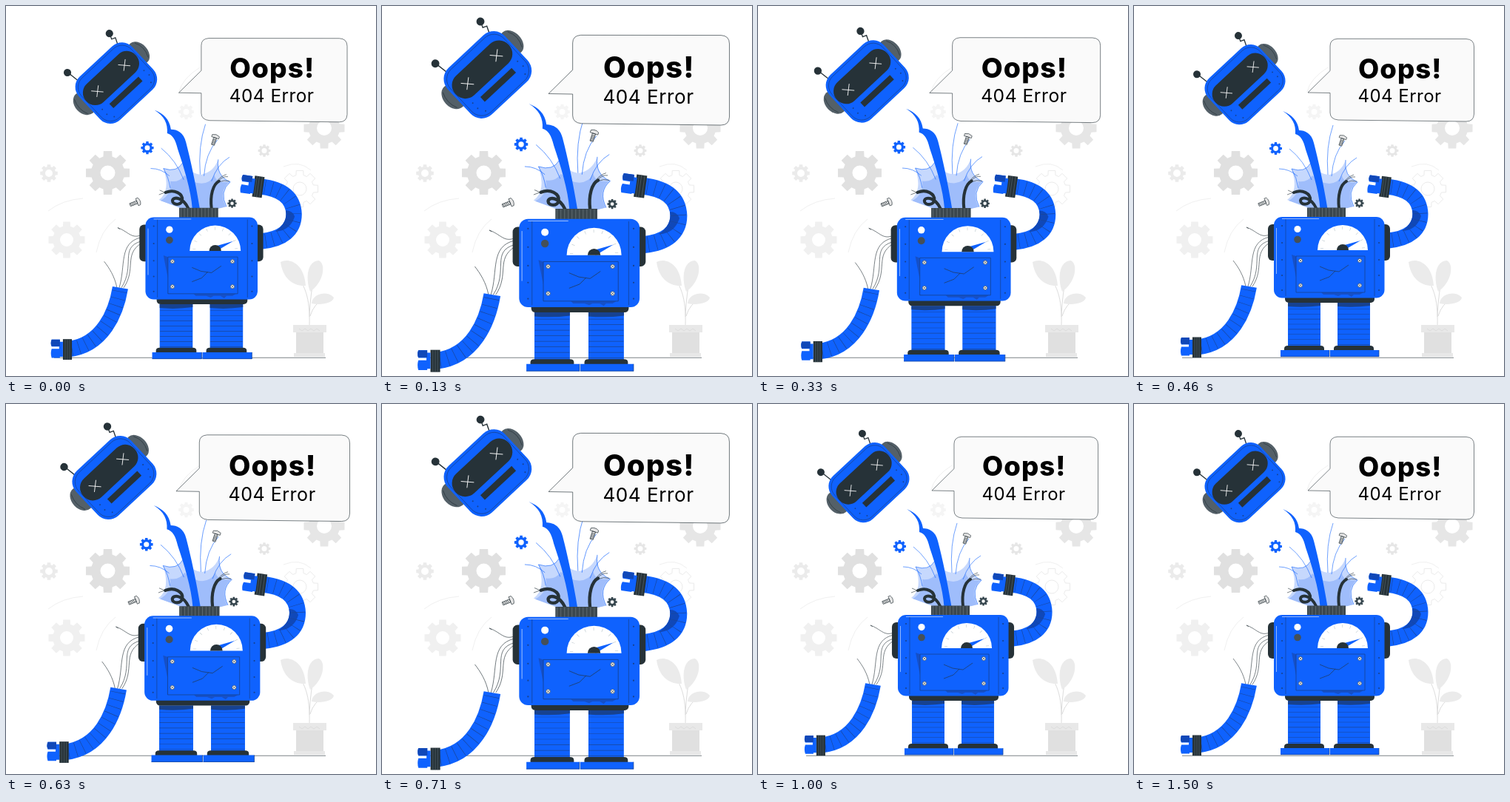
Animation of 500x500 px, one loop 1.54 s. Source, as an HTML page:

```html
<!DOCTYPE html>
<html lang="en">
<head>
<meta charset="utf-8">
<title>404 Error</title>
<style>
  html, body { margin: 0; height: 100%; overflow: hidden; background: #fff; }
  svg { display: block; width: 100vw; height: 100vh; }
  text { font-family: Inter, Roboto, sans-serif; text-anchor: middle; }
  .blue { fill: #0f62fe; }
  .dark { fill: #263238; }
  .grey { fill: #546068; }
  .line { fill: none; stroke: #263238; stroke-width: .6; }
  .faint { fill: none; stroke: #f0f0f0; stroke-width: 1; }
  .spark { fill: none; stroke: #0f62fe; stroke-width: .6; }
  .tube { fill: none; stroke: #263238; stroke-width: 4; stroke-linecap: round; }
  .arm { fill: none; stroke: #0f62fe; stroke-width: 21; }
  .ribs { fill: none; stroke: #1a4596; stroke-width: 19; stroke-dasharray: .6 9; stroke-dashoffset: -5; }
  .edge { fill: none; stroke: #174290; stroke-width: .7; }
  .shine { fill: none; stroke: #cfdffd; stroke-width: .7; }
</style>
</head>
<body>
<svg viewBox="0 0 500 500">
  <defs>
    <path id="stump" d="M155.500 379C150 412 132 456 86 461"/>
    <path id="elbow" d="M344 317C372 314 387 302 387 281C386 257 368 247 342 244"/>
    <g id="leg">
      <path class="blue" d="M208 401h44v60h-44z"/>
      <path fill="#174290" d="M208 401h44v4q-22 3 -44 1z"/>
      <path d="M230 409V459" fill="none" stroke="#1a4596" stroke-width="43" stroke-dasharray=".6 6.300"/>
      <path class="dark" d="M203 466v-3q0 -4 5 -4h44q5 0 5 4v3z"/>
      <path class="blue" d="M198 465h66v9h-66z"/>
      <path class="edge" d="M198 473.700h66M264 465v9"/>
    </g>
    <g id="screw">
      <circle r="2.600" fill="#f5f5f5" stroke="#263238" stroke-width=".5"/>
      <path class="line" d="M-1.500 -1.500l3 3M-1.500 1.500l3 -3"/>
    </g>
    <g id="bolt" stroke="#263238" stroke-width=".6" fill="#e6e6e6">
      <path d="M-2 -3h4v10h-4zM-5 -6q5 -3 10 0v3h-10z"/>
      <path d="M-2 0l4 -1M-2 2l4 -1M-2 4l4 -1M-2 6l4 -1"/>
    </g>
  </defs>

  <g id="backdrop">
    <path class="faint" d="M57 277Q76 262 104 260M122 333Q128 303 148 288M234 116Q238 98 262 83M375 217Q397 208 412 222"/>
  </g>
  <g id="plant">
    <path d="M410 432C411 395 405 375 385 356M410 420Q411 385 419 358M411 419Q416 402 430 396" fill="none" stroke="#dcdcdc"/>
    <path fill="#ebebeb" d="M371 346C381 340 403 346 405 378C388 379 374 368 371 346ZM411 386C404 366 408 344 423 344C433 349 429 374 411 386ZM413 402C414 388 435 384 443 394C442 401 427 405 413 402Z"/>
    <path fill="#e0e0e0" d="M392 441h37v28h-37z"/>
    <path fill="#e8e8e8" d="M388 431h45v10h-45zM389 469h42v5h-42z"/>
    <path d="M396 436l4 3l4 -3l4 3l4 -3l4 3l4 -3l4 3" fill="none" stroke="#dcdcdc"/>
  </g>
  <path class="line" d="M65 475.300H432"/>

  <g id="robot">
    <path fill="#c6d8fd" d="M238 274L207 262Q223 250 213 220Q231 226 239 212Q250 228 264 228Q280 225 286 208Q283 230 302 238Q287 251 297 271L284 274Z"/>
    <path fill="#9fbdfb" d="M240 274L209 263Q225 254 222 237Q234 239 241 229Q252 240 264 240Q276 239 281 229Q283 240 301 238Q286 251 296 271L284 274Z"/>
    <path class="spark" d="M222 246Q220 232 213 220Q231 226 239 212M286 208Q283 230 302 238Q287 251 297 271M269 161Q259 190 262 228M285 182Q269 200 267 230M210 193Q230 209 240 235M196 220Q210 220 221 230M301 205Q285 214 277 237"/>
    <path class="blue" d="M201 142C213 147 221 154 223 168C231 168 240 172 243 185C249 208 256 240 261.500 274H251.500C250 249 240 218 232 194C229 181 225 175 218 173C219 160 214 150 201 142Z"/>
    <path class="tube" d="M216 252C228 247 239 254 238 262C237 270 225 269 225 263C226 257 239 258 246 273M277 273C275 256 279 241 287 237"/>
    <path class="line" d="M286 237Q292 230 299 231M287 238Q294 235 301 237M285 236Q290 230 297 228M215 252l-7 -3M215 252l-8 3"/>
    <use href="#bolt" transform="translate(281 182) rotate(18)"/>
    <use href="#bolt" transform="translate(175 266) rotate(68)"/>

    <g id="head" transform="translate(151 108) rotate(-43)">
      <path class="line" style="stroke-width:1.300" d="M-37 -56L-34 -36M39 -56L36 -49L41 -47L37 -38"/>
      <circle class="dark" cx="39" cy="-56.500" r="5"/>
      <circle class="dark" cx="-37.500" cy="-56.500" r="5"/>
      <ellipse class="grey" cx="-49" cy="-11" rx="13" ry="17"/>
      <ellipse class="grey" cx="50" cy="-11" rx="12" ry="17"/>
      <path class="line" d="M-55 -24q-6 13 0 26M55 -24q7 12 0 26"/>
      <rect class="blue" x="-48" y="-41.500" width="97" height="79" rx="19"/>
      <rect class="edge" x="-45" y="-38" width="91" height="72.500" rx="17"/>
      <rect class="dark" x="-45" y="-28" width="90" height="33" rx="16"/>
      <rect class="dark" x="-25" y="12" width="53" height="8"/>
      <path stroke="#fff" stroke-width=".8" d="M-31 -17l11 12m-11 -1l12 -10M19 -18l11 12m-11 -1l12 -10"/>
      <path stroke="#174290" stroke-width="1.800" stroke-linecap="round" d="M39 11h.1M40 20h.1M35 29h.1M-37 11h.1M-37 20h.1M-32 29h.1"/>
    </g>

    <path class="line" d="M151 379C148 364 141 353 134 344M154 379C163 350 153 319 183 312M157 379C176 349 154 326 183 317M160 379C177 354 160 335 183 320M183 309C170 314 166 304 152 299l3 2"/>
    <use href="#stump" class="arm"/>
    <use href="#stump" class="ribs"/>
    <g>
      <path class="dark" d="M79 447.500h12v27.500h-12z"/>
      <path class="blue" d="M64 448h11v3h4v20h-4v1.500h-11q-2 -6 0 -12h10v-3h-10q-2 -5 0 -9.500z"/>
      <path fill="#1048b8" d="M64 448h11v9h-11q-2 -4 0 -9z"/>
      <path stroke="#607078" stroke-width=".5" d="M82 448v27M85 448v27M88 448v27"/>
    </g>

    <use href="#elbow" class="arm"/>
    <path fill="#1048b8" d="M376 276Q379 292 362 304Q382 303 388 284Q385 276 376 276Z"/>
    <use href="#elbow" class="ribs"/>
    <g transform="translate(340 244.500) rotate(8)">
      <path class="dark" d="M-7 -14h13v28h-13z"/>
      <path class="blue" d="M-23 -13h13v3h4v20h-4v1h-13q-2 -6 0 -11h9v-4h-9q-2 -5 0 -9z"/>
      <path fill="#1048b8" d="M-23 -13h13v8h-13q-2 -4 0 -8z"/>
      <path stroke="#607078" stroke-width=".5" d="M-4 -14v28M-1 -14v28M3 -14v28"/>
    </g>

    <use href="#leg"/>
    <use href="#leg" x="67"/>
    <rect class="dark" x="204" y="388" width="121" height="13" rx="5"/>
    <rect class="dark" x="181" y="295" width="16" height="49" rx="6"/>
    <rect class="dark" x="330" y="295" width="16" height="49" rx="6"/>
    <path fill="#3b474d" d="M234 272.500h52v13h-52z"/>
    <path d="M236 279H286" fill="none" stroke="#727d83" stroke-width="12" stroke-dasharray=".6 4"/>
    <rect class="blue" x="189" y="285" width="149.500" height="109.500" rx="11"/>
    <path class="edge" d="M205 288V392M325 288V392"/>
    <path class="shine" d="M192.500 300v62M200 287.500h50"/>
    <path stroke="#174290" stroke-width="2" stroke-linecap="round" d="M200 297h.1M200 320h.1M200 343h.1M200 364h.1M200 384h.1M331 297h.1M331 320h.1M331 343h.1M331 364h.1M331 384h.1"/>
    <circle cx="221" cy="301.500" r="4.600" fill="#fff"/>
    <circle cx="221" cy="315.500" r="4.800" fill="#455058"/>
    <path fill="#fff" d="M248 330a34 34 0 0 1 68 0z"/>
    <path d="M254 328a28 28 0 0 1 56 0" fill="none" stroke="#b0bec5" stroke-width="4" stroke-dasharray=".5 10.300"/>
    <path class="blue" d="M281 324L306 317L284 330Z"/>
    <path class="dark" d="M274 330a8 8 0 0 1 16 0z"/>
    <path fill="#1550c8" d="M213 336l6 2v49h91l-5 3h-8l-3 3l-5 -3h-9l-4 2l-6 -2h-14l-3 -3h-30z"/>
    <path class="blue" stroke="#174290" stroke-width=".8" d="M219 338h93v49h-93z"/>
    <path class="line" d="M251 352L263 357L277 359L290 350M251 371L264 366L272 358"/>
    <use href="#screw" x="225" y="344"/>
    <use href="#screw" x="305" y="344"/>
    <use href="#screw" x="225" y="377.500"/>
    <use href="#screw" x="305" y="377.500"/>
  </g>

  <g id="bubble">
    <path d="M275 44.300L449 44.500Q459.500 45 459.500 55V146Q459 156 449 156L276 154Q265 153 265 144V117.500L235 117L265 87.500V54Q265 45 275 44.300Z" fill="#fafafa" stroke="#263238" stroke-width=".6"/>
    <text x="359.700" y="97.500" font-size="36.500" font-weight="800" letter-spacing=".03em">Oops!</text>
    <text x="359" y="129.500" font-size="24" letter-spacing=".02em">404 Error</text>
  </g>
</svg>
<script>
  const byId = id => document.getElementById(id);

  function gear(parent, x, y, radius, hole, color, outline) {
    const points = [];
    for (let tooth = 0; tooth < 8; tooth++) {
      for (const [offset, reach] of [[-.27, .76], [-.19, 1], [.19, 1], [.27, .76]]) {
        const a = tooth * Math.PI / 4 + offset;
        points.push((x + Math.cos(a) * radius * reach).toFixed(2) + ' ' + (y + Math.sin(a) * radius * reach).toFixed(2));
      }
    }
    const path = document.createElementNS('http://www.w3.org/2000/svg', 'path');
    path.setAttribute('d', `M${points.join('L')}ZM${x - hole} ${y}a${hole} ${hole} 0 1 0 ${2 * hole} 0a${hole} ${hole} 0 1 0 ${-2 * hole} 0Z`);
    path.setAttribute('fill-rule', 'evenodd');
    path.setAttribute('fill', outline ? 'none' : color);
    if (outline) path.setAttribute('stroke', color);
    parent.append(path);
  }

  const backdrop = byId('backdrop'), robot = byId('robot'), bubble = byId('bubble');
  gear(backdrop, 137.5, 225.5, 30, 10, '#e0e0e0');
  gear(backdrop, 58, 226, 12, 5, '#ebebeb');
  gear(backdrop, 82, 316, 25, 9, '#f0f0f0');
  gear(backdrop, 243.5, 143, 10.5, 4, '#f5f5f5');
  gear(backdrop, 349, 195.5, 8.5, 3.5, '#e6e6e6');
  gear(backdrop, 430, 165, 28, 10, '#e6e6e6');
  gear(backdrop, 397, 247, 25, 9, '#ebebeb', true);
  gear(robot, 191.5, 192.5, 8.6, 3.4, '#0f62fe');
  gear(robot, 304.5, 266.5, 6.2, 2.2, '#37474f');

  const LOOP = 1540, RISE = 150, FALL = 297;
  const beat = t => Math.max(0, t < RISE ? t / RISE : 1 - (t - RISE) / FALL);

  function scaleAbout(node, x, y, s) {
    node.setAttribute('transform', `translate(${x} ${y}) scale(${s}) translate(${-x} ${-y})`);
  }

  const start = performance.now();
  function draw(now) {
    const t = Math.max(0, now - start) % LOOP;
    const scale = 1 + .09 * Math.max(beat(t + 22), beat(t - 556));
    scaleAbout(robot, 230.5, 254.5, scale);
    scaleAbout(bubble, 347.5, 99.8, scale);
    requestAnimationFrame(draw);
  }
  draw(start);
</script>
</body>
</html>
```
